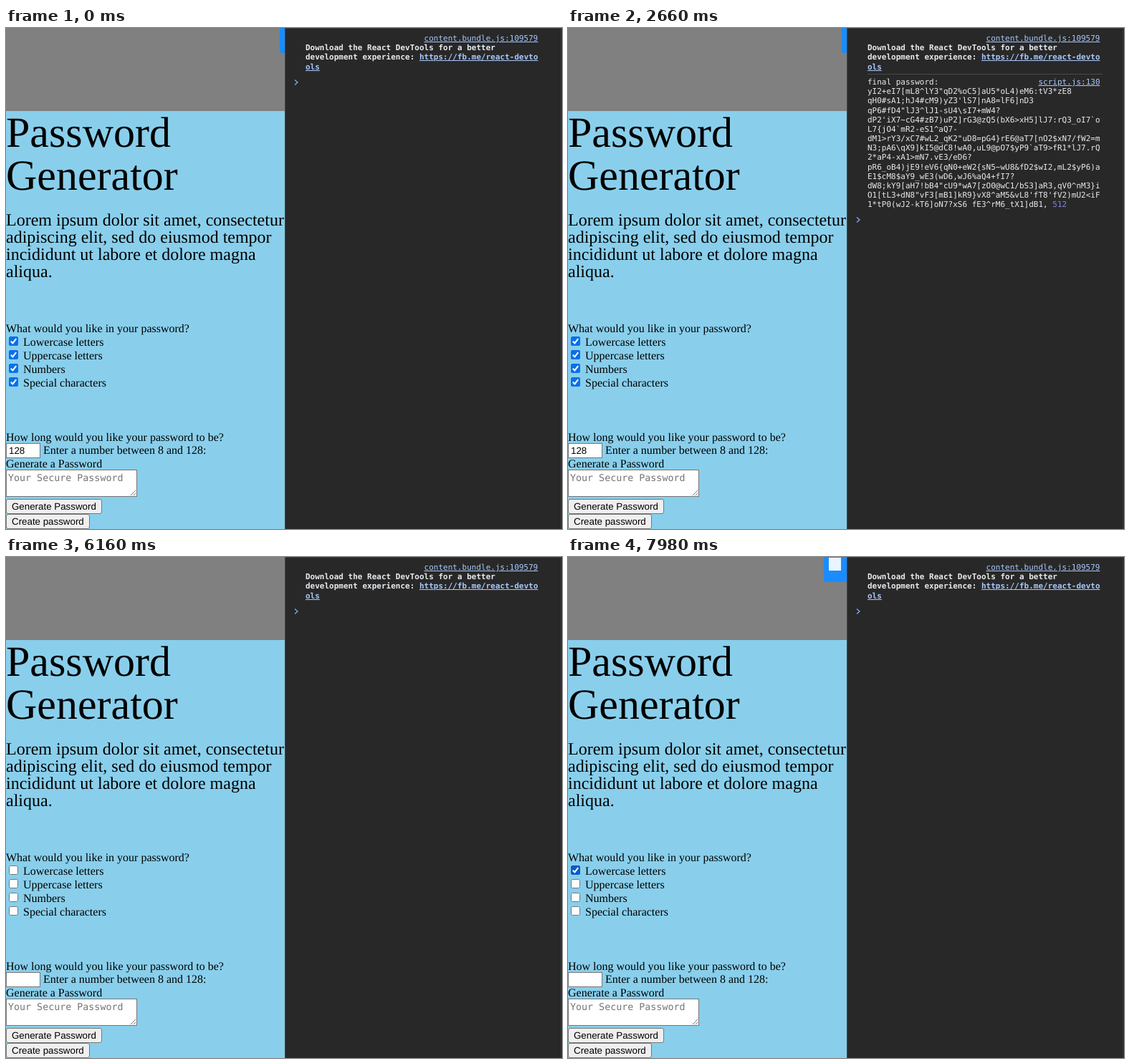
Animation of 776 by 700 pixels, one loop 8 s. Source, as an HTML page:

```html
<!DOCTYPE html>
<html lang="en">
<head>
<meta charset="utf-8">
<title>Password Generator</title>
<style>
  html, body { margin: 0; width: 100%; height: 100%; overflow: hidden; background: #282828; }
  body { position: relative; text-rendering: geometricPrecision; }
  svg { position: absolute; left: 0; top: 0; display: block; }

  .page { font: 16px "Liberation Serif", Times, serif; fill: #000; }
  .title { font-size: 60px; }
  .intro { font-size: 24px; }
  .ui { font: 13.333px "Liberation Sans", Arial, sans-serif; }
  .hint { font: 13.333px "DejaVu Sans Mono", monospace; fill: #757575; }
  .field { fill: #fff; stroke: #767676; }
  .button { fill: #efefef; stroke: #767676; }

  pre {
    position: absolute; left: 418px; width: 324.5px; margin: 0;
    font: 11px/13.17px "DejaVu Sans Mono", monospace; color: #e8eaed;
  }
  pre u { color: #a8c7fa; }
  .origin { position: absolute; right: 0; top: 0; }
  .notice { top: 8px; }
  .output { top: 69px; }
  .number { color: #7f86e0; }

  /* 2660 ms: password logged, 6090 ms: page reloaded, 7770 ms: box ticked */
  .logged, .prompt, .preset, .first, .badge { animation: 8s step-end infinite; }
  .logged { animation-name: logged; }
  .prompt { animation-name: prompt; }
  .preset { animation-name: preset; }
  .first { animation-name: first; }
  .badge { animation-name: badge; }

  @keyframes logged {
    0%, 76.125%, 100% { visibility: hidden; }
    33.25% { visibility: visible; }
  }
  @keyframes prompt {
    0%, 76.125%, 100% { transform: none; }
    33.25% { transform: translateY(192px); }
  }
  @keyframes preset {
    0% { visibility: visible; }
    76.125%, 100% { visibility: hidden; }
  }
  @keyframes first {
    0% { visibility: visible; fill: #0a70ea; }
    76.125% { visibility: hidden; }
    97.125%, 100% { visibility: visible; fill: #0b5cc4; }
  }
  @keyframes badge {
    0% { transform: translateX(-7px); }
    76.125% { transform: none; }
    80.5% { transform: translateX(-3px); }
    81.375% { transform: translateX(-14px); }
    82.25% { transform: translateX(-22px); }
    83.125% { transform: translateX(-28px); }
    84% { transform: translateX(-31px); }
    84.875%, 100% { transform: translateX(-32px); }
  }
</style>
</head>
<body>
<svg width="776" height="700" viewBox="0 0 776 700">
  <defs>
    <clipPath id="view"><rect width="389" height="700"/></clipPath>
    <rect id="box" x="4.5" y="431.5" width="12" height="12" rx="2" class="field"/>
    <g id="tick">
      <rect x="4" y="431" width="13" height="13" rx="2.5"/>
      <path d="M6.8 437.8 9.4 440.4 14.2 434.2" fill="none" stroke="#fff" stroke-width="2"/>
    </g>
  </defs>

  <rect width="389" height="700" fill="#89cfec"/>
  <rect width="389" height="116" fill="#808080"/>
  <rect x="389" width="1" height="700" fill="#47494a"/>
  <rect x="390" width="386" height="1" fill="#3c3c3c"/>
  <rect x="774" width="1" height="700" fill="#3a3a3a"/>

  <g clip-path="url(#view)">
    <g class="badge" fill="#1a8cff">
      <path d="M389 0H429V35H393Q389 35 389 31Z"/>
      <rect x="396" y="1" width="17" height="18" fill="#eaf4ff"/>
    </g>
  </g>

  <g class="page">
    <g class="title">
      <text x="0" y="166">Password</text>
      <text x="0" y="226">Generator</text>
    </g>
    <g class="intro">
      <text x="0" y="276">Lorem ipsum dolor sit amet, consectetur</text>
      <text x="0" y="300">adipiscing elit, sed do eiusmod tempor</text>
      <text x="0" y="324">incididunt ut labore et dolore magna</text>
      <text x="0" y="348">aliqua.</text>
    </g>
    <text x="0" y="425">What would you like in your password?</text>
    <text x="24" y="444">Lowercase letters</text>
    <text x="24" y="463">Uppercase letters</text>
    <text x="24" y="482">Numbers</text>
    <text x="24" y="501">Special characters</text>
    <text x="0" y="577">How long would you like your password to be?</text>
    <text x="52" y="595">Enter a number between 8 and 128:</text>
    <text x="0" y="614">Generate a Password</text>
  </g>

  <use href="#box"/>
  <use href="#box" y="19"/>
  <use href="#box" y="38"/>
  <use href="#box" y="57"/>
  <use href="#tick" class="first"/>
  <g class="preset" fill="#0a70ea">
    <use href="#tick" y="19"/>
    <use href="#tick" y="38"/>
    <use href="#tick" y="57"/>
  </g>

  <rect class="field" x=".5" y="580.5" width="47" height="20"/>
  <text class="ui preset" x="4" y="595">128</text>

  <rect class="field" x=".5" y="617.5" width="182" height="37"/>
  <text class="hint" x="3" y="633">Your Secure Password</text>
  <path d="M174 653 181 646M178 653 181 650" stroke="#777" fill="none"/>

  <rect class="button" x=".5" y="658.5" width="133" height="20" rx="2.5"/>
  <text class="ui" x="8" y="673">Generate Password</text>
  <rect class="button" x=".5" y="679.5" width="116" height="20" rx="2.5"/>
  <text class="ui" x="8" y="694">Create password</text>

  <rect class="logged" x="418" y="64" width="328" height="1" fill="#4a4a4a"/>
  <path class="prompt" d="M403 72.5 407 76 403 79.5" fill="none" stroke="#7cacf8" stroke-width="1.3"/>
</svg>

<pre class="notice"><u class="origin">content.bundle.js:109579</u>
<b>Download the React DevTools for a better
development experience: <u>https://fb.me/react-devto
ols</u></b></pre>

<pre class="output logged"><u class="origin">script.js:130</u>final password:
yI2+eI7[mL8^lY3"qD2%oC5]aU5*oL4)eM6:tV3*zE8
qH0#sA1;hJ4#cM9)yZ3'lS7|nA8=lF6]nD3
qP6#fD4"lJ3^lJ1-sU4\sI7+mW4?
dP2'iX7~cG4#zB7)uP2]rG3@zQ5(bX6&gt;xH5]lJ7:rQ3_oI7`o
L7{jO4`mR2-eS1^aQ7-
dM1&gt;rY3/xC7#wL2_qK2"uD8=pG4}rE6@aT7[nO2$xN7/fW2=m
N3;pA6\qX9]kI5@dC8!wA0,uL9@pO7$yP9`aT9&gt;fR1*lJ7.rQ
2*aP4-xA1&gt;mN7.vE3/eD6?
pR6_oB4)jE9!eV6{qN0+eW2{sN5~wU8&amp;fD2$wI2,mL2$yP6)a
E1$cM8$aY9_wE3(wD6,wJ6%aQ4+fI7?
dW8;kY9[aH7!bB4"cU9*wA7[zO0@wC1/bS3]aR3,qV0^nM3}i
O1[tL3+dN8"vF3[mB1]kR9}vX8^aM5&amp;vL8'fT8'fV2)mU2&lt;iF
1*tP0(wJ2-kT6]oN7?xS6 fE3^rM6_tX1]dB1, <span class="number">512</span></pre>
</body>
</html>
```
